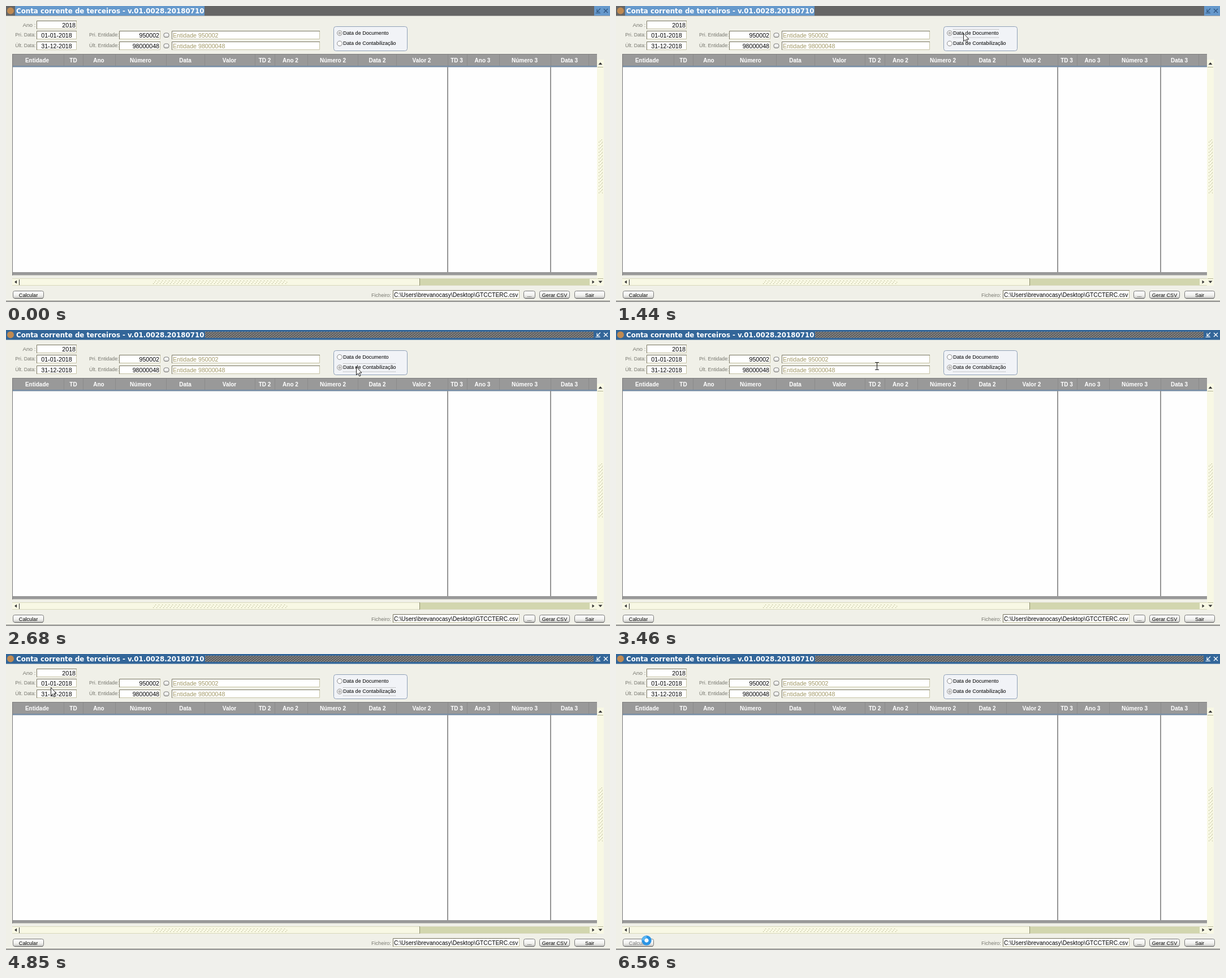
These frames come from a looping animation (1068 by 525 pixels, 8 s). An HTML page:

```html
<!DOCTYPE html>
<html lang="pt">
<head>
<meta charset="utf-8">
<title>Conta corrente</title>
<style>
html, body { margin: 0; width: 100%; height: 100%; overflow: hidden; background: #f0f0e8; }
svg { display: block; width: 1068px; height: 525px; font-family: "Liberation Sans", Arial, sans-serif; }
text { white-space: pre; }
</style>
</head>
<body>
<svg id="stage" viewBox="0 0 1068 525" xmlns="http://www.w3.org/2000/svg">
  <defs>
    <pattern id="weave" x="352" y="3" width="5" height="4" patternUnits="userSpaceOnUse">
      <rect width="5" height="4" fill="#686868"/>
      <path d="M0 0h1.4v1.2h-1.4zM2.5 2h1.4v1.2h-1.4z" fill="#b4b4b4"/>
      <path d="M1.4 1.2h1.2v1h-1.2zM3.9 3.1h1.1v.9h-1.1z" fill="#3a3a3a"/>
    </pattern>
    <pattern id="gripX" x="260" y="487" width="6" height="6" patternUnits="userSpaceOnUse">
      <path d="M0 5h1.2v1h-1.2zM2 2.6h1.2v1h-1.2zM4 0h1.2v1h-1.2z" fill="#a8a87c"/>
    </pattern>
    <pattern id="gripY" x="1048" y="237" width="6" height="6" patternUnits="userSpaceOnUse">
      <path d="M0 4h1.2v1h-1.2zM2.4 2h1.2v1h-1.2zM4.8 0h1.2v1h-1.2z" fill="#a8a87c"/>
    </pattern>
    <linearGradient id="face" x2="0" y2="1">
      <stop offset="0" stop-color="#fff"/>
      <stop offset=".55" stop-color="#f2f2f0"/>
      <stop offset="1" stop-color="#c9c9c6"/>
    </linearGradient>
  </defs>
</svg>
<script>
const LOOP = 8000;
const stage = document.getElementById('stage');

function add(tag, attrs, parent = stage) {
  const el = document.createElementNS('http://www.w3.org/2000/svg', tag);
  for (const key in attrs) el.setAttribute(key, attrs[key]);
  parent.appendChild(el);
  return el;
}
const group = (parent = stage) => add('g', {}, parent);
const rect = (x, y, width, height, fill, parent, more) =>
  add('rect', { x, y, width, height, fill, ...more }, parent);
const path = (d, stroke, parent, more) =>
  add('path', { d, stroke, fill: 'none', ...more }, parent);
function label(str, x, y, size, fill, anchor = 'start', more, parent) {
  const el = add('text', { x, y, 'font-size': size, fill, 'text-anchor': anchor, ...more }, parent);
  el.textContent = str;
  return el;
}
const show = (el, on) => el.setAttribute('visibility', on ? 'visible' : 'hidden');

rect(0, 0, 1068, 525, '#f0f0e8');

// Title bar in both states
function windowIcons(color, parent) {
  path('M1051 4.5L1045.5 10M1045 5.5V10.5H1050M1042.5 12.5H1051', color, parent, { 'stroke-width': 1.2 });
  path('M1057 5L1064 12M1064 5L1057 12', color, parent, { 'stroke-width': 1.3 });
}
const idleBar = group();
rect(0, 0, 1068, 17.5, '#666', idleBar);
rect(16, 0, 335, 17, '#6699cc', idleBar);
rect(1040, 0, 28, 17, '#6699cc', idleBar);
windowIcons('#2f5580', idleBar);

const activeBar = group();
rect(0, 0, 1068, 17.5, '#336699', activeBar);
rect(352, 3, 687, 11, 'url(#weave)', activeBar);
windowIcons('#fff', activeBar);

add('circle', { cx: 8, cy: 8.5, r: 6, fill: '#c08a52' });
label('Conta corrente de terceiros - v.01.0028.20180710', 18, 13, 11.82, '#fff', 'start',
  { 'font-family': '"DejaVu Sans", Verdana, sans-serif', 'font-weight': 700 });

// Form fields: x, y, width, height, text, alignment, colour
const INK = '#000', MUTED = '#a39a68', GREY = '#77776f';
const fields = [
  [54, 26, 71, 15, '2018', 'end', INK],
  [54, 44, 71, 15, '01-01-2018', 'middle', INK],
  [54, 63, 71, 15, '31-12-2018', 'middle', INK],
  [200, 44, 73, 15, '950002', 'end', INK],
  [200, 63, 73, 15, '98000048', 'end', INK],
  [293, 44, 262, 15, 'Entidade 950002', 'start', MUTED],
  [293, 63, 262, 15, 'Entidade 98000048', 'start', MUTED],
  [684, 504, 224, 15, 'C:\\Users\\brevanocasy\\Desktop\\GTCCTERC.csv', 'start', INK, 10.25]
];
for (const [x, y, w, h, str, anchor, color, size = 10.65] of fields) {
  rect(x, y, w, h, '#fff');
  path(`M${x + w - .5} ${y}V${y + h - .5}H${x}`, '#c6c3a4');
  path(`M${x + .5} ${y + h}V${y + .5}H${x + w}`, '#77745f');
  const tx = { start: x + 2, middle: x + w / 2, end: x + w - 2 }[anchor];
  label(str, tx, y + 12, size, color, anchor);
}
label('Ano :', 52.5, 36.5, 9.9, GREY, 'end');
for (const [i, word] of ['Pri.', 'Últ.'].entries()) {
  const y = 54 + i * 18.5;
  label(word + ' Data:', 52.5, y, 8.7, GREY, 'end');
  label(word + ' Entidade:', 199.5, y, 8.75, GREY, 'end');
  rect(279, 48 + i * 19, 9, 7.5, 'url(#face)', stage, { rx: 3, stroke: '#777' });
}
label('Ficheiro:', 646, 516, 9.1, GREY);

// Radio group
rect(579.5, 36.5, 130, 43, '#f1f3f7', stage, { rx: 4, stroke: '#8fa0b8' });
const radios = ['Data de Documento', 'Data de Contabilização'].map((str, i) => {
  const y = 48 + i * 18.5, end = i ? 690 : 677;
  add('circle', { cx: 590, cy: y, r: 4.4, fill: '#fff', stroke: '#888' });
  const dot = add('circle', { cx: 590, cy: y, r: 2.6, fill: '#bdbdbd' });
  label(str, 596, y + 2.7, 9.05, INK);
  const top = i ? 59.5 : 41.5;
  const ring = path(`M596 ${top}H${end}M596 ${top + 14.5}H${end}`, '#999', stage, { 'stroke-dasharray': '1 1' });
  return { dot, ring };
});

// Table
rect(11, 85, 1034, 393, '#fefefe');
rect(11, 85, 1034, 23, '#999');
rect(11, 85, 1034, 1, '#7d7d7d');
rect(11, 106, 1034, 1, '#6f8cab');
rect(11, 107, 1034, 1.5, '#7c8fa3');
rect(11, 472, 1034, 5, '#999');
rect(11, 477, 1034, 1, '#c4c4be');
for (const x of [102, 136, 193, 283, 351, 440, 475, 533, 622, 690, 781, 815, 872, 963, 1030])
  rect(x, 86, 1, 20, '#8b8b8b');
for (const x of [780, 962]) rect(x, 108, 2, 364, '#949494');
rect(11, 85, 1, 393, '#777');
const heads = { Entidade: 55, TD: 119, Ano: 164, 'Número': 238, Data: 317, Valor: 395,
  'TD 2': 457.5, 'Ano 2': 503, 'Número 2': 578, 'Data 2': 656.5, 'Valor 2': 735,
  'TD 3': 797, 'Ano 3': 842.5, 'Número 3': 917, 'Data 3': 996 };
for (const name in heads)
  label(name, heads[name], 100, 10, '#fff', 'middle', { 'font-weight': 700 });

// Scroll bars
rect(11, 483, 1034, 13, '#f8f8e4');
rect(731, 483, 301, 13, '#d2d6ae');
path('M11 483.5H1045M11 495.5H1045', '#d8d8bc');
path('M731.5 483V496', '#8f8f70');
path('M23.5 485V495', '#444');
rect(260, 487, 238, 6, 'url(#gripX)');
rect(1045, 95, 12, 401, '#f8f8e4');
path('M1046 108.5H1056M1046 483.5H1056', '#b8b898');
rect(1048, 237, 7, 96, 'url(#gripY)');
for (const d of ['M15 489.5l4 -3v6z', 'M1040.5 489.5l-4 -3v6z', 'M1047.5 104h7l-3.5 -4z', 'M1047.5 487.5h7l-3.5 4z'])
  add('path', { d, fill: '#333' });

// Buttons
function button(x, w, str) {
  rect(x + .5, 505.5, w - 1, 13, 'url(#face)', stage, { rx: 3, stroke: '#777' });
  path(`M${x + 3} 518.7H${x + w - 2}`, '#5e5e5e');
  return label(str, x + w / 2, 515.5, 9.1, INK, 'middle');
}
const calcText = button(12, 55, 'Calcular');
button(915, 21, '...');
button(943, 54, 'Gerar CSV');
button(1005, 54, 'Sair');
rect(0, 523, 1068, 1, '#3c3c3c');
rect(0, 524, 1068, 1, '#e8e8e4');

// Pointer shapes, drawn around their hot spot
const cursors = { arrow: group(), beam: group(), busy: group() };
path('M.5 .5V14.8L3.6 11.8 5.8 17 8 16 5.8 11H10Z', '#222', cursors.arrow, { fill: '#fff' });
path('M-3 -6.5H0Q.5 -6.5 .5 -5.5Q.5 -6.5 1 -6.5H4M.5 -6V6M-3 6.5H0Q.5 6.5 .5 5.5Q.5 6.5 1 6.5H4',
  '#222', cursors.beam, { 'stroke-width': 1.1 });
add('circle', { r: 6.2, fill: '#f4faff', stroke: '#2a94e4', 'stroke-width': 5 }, cursors.busy);
path('M-6.2 0A6.2 6.2 0 0 1 0 -6.2', '#5cb6f2', cursors.busy, { 'stroke-width': 4 });

// Moves: start, end, steps, waypoints as [progress, x, y]
const moves = [
  [350, 580, 4, [[0, 927, 490], [1, 688, 295]]],
  [900, 1440, 8, [[0, 688, 295], [.6, 634, 112], [1, 614, 48]]],
  [2370, 2600, 4, [[0, 614, 48], [1, 618.5, 65]]],
  [3300, 3700, 6, [[0, 618.5, 65], [.5, 461, 64], [1, 145, 91]]],
  [4010, 4470, 7, [[0, 145, 91], [3 / 7, 117, 82.5], [1, 82, 52]]],
  [4850, 5020, 3, [[0, 82, 52], [1, 74, 74]]],
  [5250, 5720, 7, [[0, 74, 74], [3 / 7, 64, 380], [1, 66, 451]]],
  [6030, 6250, 4, [[0, 66, 451], [1, 54, 505]]],
  [6560, 6561, 1, [[0, 54, 505], [1, 54, 508]]]
];
function along(points, u) {
  let i = 1;
  while (i < points.length - 1 && u > points[i][0]) i++;
  const [u0, x0, y0] = points[i - 1], [u1, x1, y1] = points[i];
  const k = (u - u0) / (u1 - u0);
  return [x0 + (x1 - x0) * k, y0 + (y1 - y0) * k];
}
function pointerAt(t) {
  const move = moves.filter(m => t >= m[0]).pop();
  if (!move) return null;
  const [start, end, steps, points] = move;
  const gap = (end - start) / Math.max(1, steps - 1);
  // The pointer is redrawn in whole steps
  const step = Math.min(steps, 1 + Math.floor((t - start + 5) / gap));
  return along(points, step / steps);
}
const inside = (x, y, [left, top, w, h]) => x >= left && x <= left + w && y >= top && y <= top + h;
function shapeAt(t, x, y) {
  if (t >= 6560) return 'busy';
  return [[11, 108, 1034, 364], ...fields].some(box => inside(x, y, box)) ? 'beam' : 'arrow';
}

function render(t) {
  const active = t >= 2680;
  show(idleBar, !active);
  show(activeBar, active);
  show(radios[0].dot, !active);
  show(radios[1].dot, active);
  show(radios[0].ring, t >= 1360 && t < 2520);
  show(radios[1].ring, t >= 2520 && t < 6560);
  calcText.setAttribute('fill', t >= 6560 ? '#777' : INK);

  const pos = pointerAt(t);
  const shape = pos && shapeAt(t, ...pos);
  for (const name in cursors) show(cursors[name], name === shape);
  if (pos) cursors[shape].setAttribute('transform', `translate(${pos.map(Math.round)})`);
}

const began = performance.now();
function tick() {
  render((performance.now() - began) % LOOP);
  requestAnimationFrame(tick);
}
tick();
</script>
</body>
</html>
```
